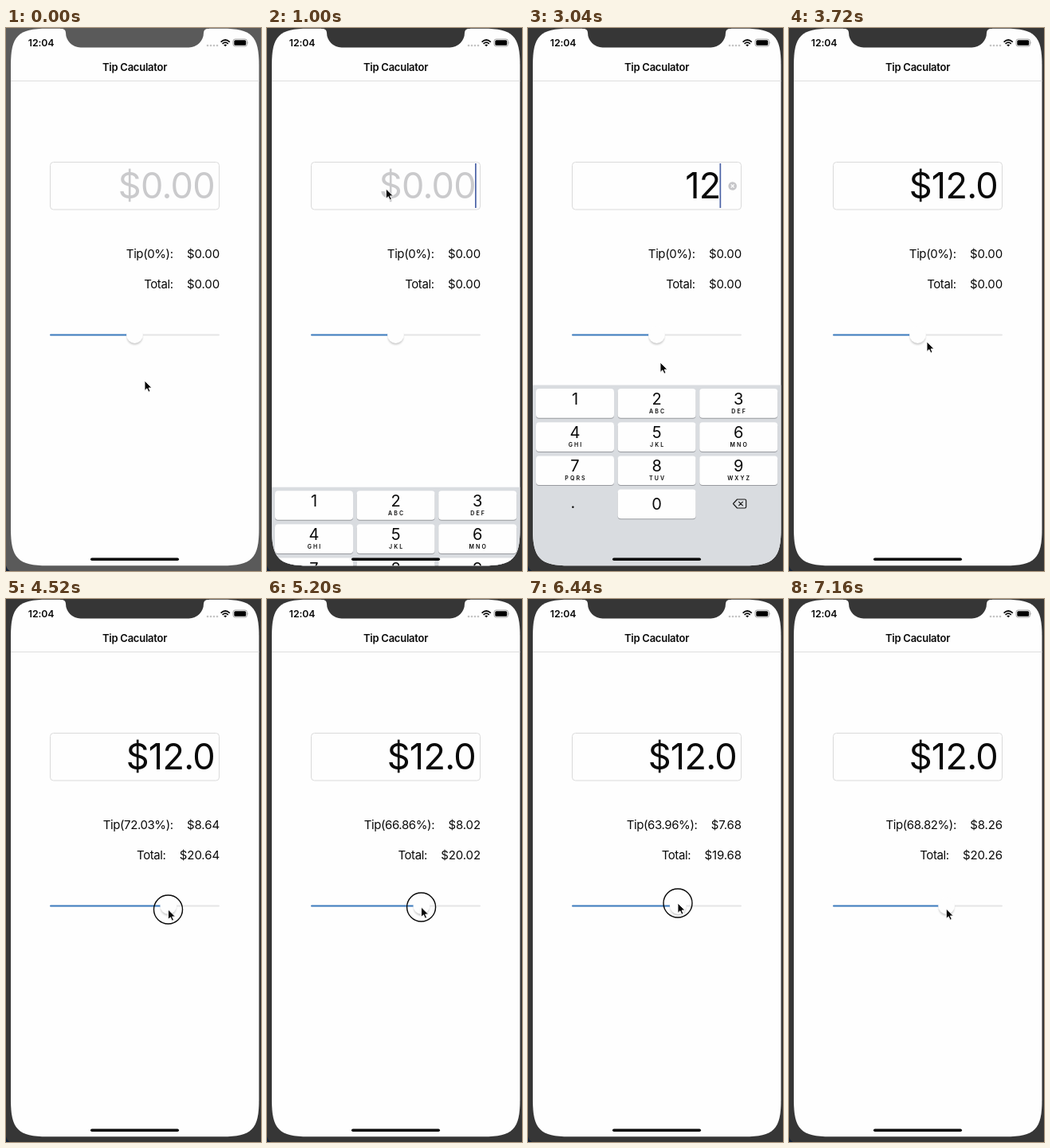
An HTML page that plays this animation: 320 px wide and 682 px high, repeating every 7.2 s.

```html
<!DOCTYPE html>
<html lang="en">
<head>
<meta charset="utf-8">
<title>Tip Caculator</title>
<style>
  html, body { margin: 0; width: 100%; height: 100%; overflow: hidden; background: #363636; }
  svg { display: block; width: 100vw; height: 100vh; }
  text { font-family: Inter, Roboto, "Liberation Sans", sans-serif; fill: #0a0a0a; }
  .big { font-size: 45px; letter-spacing: -0.7px; text-anchor: end; }
  .label { font-size: 15px; letter-spacing: -0.1px; text-anchor: end; }
  .name { letter-spacing: -0.4px; }
  .digit { font-size: 20px; text-anchor: middle; }
  .letters { font-size: 7px; font-weight: 600; letter-spacing: 2.1px; text-anchor: middle; }
</style>
</head>
<body>
<svg viewBox="0 0 320 682" preserveAspectRatio="none">
  <defs>
    <clipPath id="screen">
      <path d="M6 46.8C6 9.9 15.1 .8 52 .8H271.5C308.4 .8 317.5 9.9 317.5 46.8V629.3
        C317.5 666.2 308.4 675.3 271.5 675.3H52C15.1 675.3 6 666.2 6 629.3Z"/>
    </clipPath>
    <filter id="soft" x="-50%" y="-50%" width="200%" height="200%">
      <feGaussianBlur stdDeviation="1.3"/>
    </filter>
  </defs>

  <rect id="bezel" width="320" height="682"/>
  <path d="M0 675Q1 680 5 682H0Z" fill="#14233a"/>

  <g clip-path="url(#screen)">
    <rect width="320" height="682" fill="#fefefe"/>
    <path d="M6 66.5H318" stroke="#dedede"/>
    <text x="161.5" y="54.3" font-size="13" font-weight="600" letter-spacing="-0.25" text-anchor="middle">Tip Caculator</text>

    <text x="27.8" y="23" font-size="12.3" font-weight="600" letter-spacing="-0.1">12:04</text>
    <g fill="#c4c4c4">
      <circle cx="253" cy="22" r="1.3"/><circle cx="257" cy="22" r="1.3"/>
      <circle cx="261" cy="22" r="1.3"/><circle cx="265" cy="22" r="1.3"/>
    </g>
    <g fill="none" stroke="#0a0a0a" stroke-width="1.7">
      <path d="M269.6 17.6Q275.2 12.4 280.8 17.6M271.6 19.8Q275.2 16.6 278.8 19.8"/>
      <path d="M273.2 21.2Q275.2 19.6 277.2 21.2L275.2 23.2Z" fill="#0a0a0a" stroke="none"/>
    </g>
    <rect x="285" y="14" width="17.5" height="9" rx="2.6" fill="none" stroke="#999" stroke-width=".9"/>
    <rect x="286.3" y="15.3" width="14.9" height="6.4" rx="1.5"/>
    <path d="M303.6 17Q305 18.5 303.6 20Z" fill="#999"/>

    <rect x="55.5" y="168.5" width="212" height="59.5" rx="4" fill="#fefefe" stroke="#dadada"/>
    <text id="amount" class="big" y="214.4"></text>
    <rect id="caret" y="170" width="1.7" height="56" fill="#4a62a6"/>
    <g id="clear">
      <circle cx="256.7" cy="198.5" r="5.3" fill="#c6c6c9"/>
      <path d="M254.7 196.5l4 4m0-4l-4 4" stroke="#fff" stroke-width="1.1"/>
    </g>

    <text id="tipName" class="label name" y="289"></text>
    <text id="tip" class="label" x="268" y="289"></text>
    <text id="totalName" class="label name" y="326.5">Total:</text>
    <text id="total" class="label" x="268" y="326.5"></text>

    <rect x="55" y="384.4" width="213" height="2.2" rx="1.1" fill="#e5e5e6"/>
    <rect id="fill" x="55" y="384.4" height="2.2" rx="1.1" fill="#3f7ec1"/>
    <g id="thumb">
      <circle cy="388" r="9.8" fill="#000" opacity=".2" filter="url(#soft)"/>
      <circle cy="385.5" r="10.4" fill="#fefefe"/>
    </g>

    <g id="keyboard"><rect y="448.5" width="320" height="234" fill="#d9dce0"/></g>
    <rect x="106" y="665.4" width="111" height="3.6" rx="1.8" fill="#050505"/>
  </g>

  <path id="notch" d="M68 0V.8Q75 .8 75 6A18.5 18.5 0 0 0 93.5 24.5H229.5A18.5 18.5 0 0 0 248 6Q248 .8 255 .8V0Z"/>

  <circle id="touch" r="18" fill="none" stroke="#0a0a0a" stroke-width="1.4"/>
  <path id="cursor" d="M0 0V12.4L2.9 9.8L4.9 14.2L7 13.2L5.1 9H9Z" fill="#080808" stroke="#fff" stroke-width=".9"/>
</svg>

<script>
const LOOP = 7200, STEP = 40;
const PRESS = 3920, RELEASE = 7040, FOCUS = 640, EDIT = 920, DONE = 3280;
const el = id => document.getElementById(id);
const set = (id, attrs) => { for (const k in attrs) el(id).setAttribute(k, attrs[k]); };
const show = (id, on) => set(id, { visibility: on ? "visible" : "hidden" });
const ramp = (t, a, b) => Math.min(1, Math.max(0, (t - a) / (b - a)));
const easeOut = p => 1 - (1 - p) ** 3;
const money = n => "$" + n.toFixed(2);

// Pointer path: time, x, y
const path = [
  [0, 174, 443], [120, 178, 438], [280, 164, 290], [440, 151, 194], [960, 151, 194],
  [1240, 114, 370], [1480, 100, 435], [1700, 88, 452], [1920, 68, 469], [2320, 68, 469],
  [2520, 134, 475], [2760, 134, 475], [3040, 166, 420], [3240, 168, 408], [3480, 170, 400],
  [3720, 173, 394], [3880, 162, 388], [4120, 186, 389], [4280, 186, 389], [4760, 221, 391],
  [4920, 221, 391], [5200, 193.571, 387], [5680, 111, 379], [5760, 108.88, 378],
  [5920, 108.88, 378], [6440, 188, 382], [6640, 208, 389], [6880, 198, 391],
  [7000, 198, 391], [7120, 197.334, 389], [7200, 197.334, 389]
];

// Smooth curve through the points that never overshoots them
function along(t, axis) {
  const slope = i => {
    const a = path[i], b = path[i + 1];
    return a && b ? (b[axis] - a[axis]) / (b[0] - a[0]) : 0;
  };
  const tangent = i => {
    const l = slope(i - 1), r = slope(i);
    return l * r > 0 ? 2 * l * r / (l + r) : 0;
  };
  let i = 0;
  while (i < path.length - 2 && t >= path[i + 1][0]) i++;
  const a = path[i], b = path[i + 1], d = b[0] - a[0], u = (t - a[0]) / d, v = 1 - u;
  return a[axis] * v * v * (1 + 2 * u) + b[axis] * u * u * (3 - 2 * u)
    + d * u * v * (v * tangent(i) - u * tangent(i + 1));
}

function buildKeys() {
  const letters = ["", "ABC", "DEF", "GHI", "JKL", "MNO", "PQRS", "TUV", "WXYZ"];
  const key = (n, col, row, sub = "") => {
    const x = 10 + col * 102.6, y = 453 + row * 42.2, mid = x + 49;
    return `<rect x="${x}" y="${y + 1}" width="98" height="36.7" rx="4" fill="#989a9f"/>
      <rect x="${x}" y="${y}" width="98" height="36.7" rx="4" fill="#fefefe"/>
      <text class="digit" x="${mid}" y="${y + (n ? 20 : 25)}">${n}</text>
      <text class="letters" x="${mid + 1}" y="${y + 30.5}">${sub}</text>`;
  };
  const keys = letters.map((s, i) => key(i + 1, i % 3, Math.floor(i / 3), s)).join("");
  el("keyboard").innerHTML += keys + key(0, 1, 3) +
    `<text class="digit" x="56.5" y="603">.</text>
     <path d="M257.5 597.5L262.5 592H272Q273.7 592 273.7 593.7V601.3Q273.7 603 272 603H262.5Z
       M264.3 594.8l5.4 5.4m0-5.4l-5.4 5.4" fill="none" stroke="#1a1a1a" stroke-width="1.2" stroke-linejoin="round"/>`;
}

function drawField(t) {
  const typed = t >= 2200 && t < DONE;
  const text = t < 2200 ? "$0.00" : t < 2720 ? "1" : t < DONE ? "12" : "$12.0";
  el("amount").textContent = text;
  set("amount", { x: typed ? 241.5 : 262 });
  el("amount").style.fill = t < 2200 ? "#cacacc" : "#0a0a0a";
  show("clear", typed);
  show("caret", t >= EDIT && t < DONE);
  const blink = 1 - ramp(t, 1400, 1560) + ramp(t, 1760, 1920);
  set("caret", { x: typed ? 240.5 : 261, opacity: blink });
}

function drawTotals(t, thumb) {
  const moved = t >= PRESS;
  const percent = (thumb - 65.5) / 1.92;
  const tip = moved ? 12 * percent / 100 : 0;
  el("tipName").textContent = `Tip(${moved ? percent.toFixed(2) : 0}%):`;
  el("tip").textContent = money(tip);
  el("total").textContent = money(moved ? 12 + tip : 0);
  for (const id of ["tip", "total"])
    set(id + "Name", { x: 268 - el(id).getComputedTextLength() - 17.3 });
}

function draw(time) {
  const t = Math.floor((time % LOOP) / STEP) * STEP;
  const x = along(t, 1), y = along(t, 2);
  const thumb = t < PRESS ? 161.5 : x + 0.3;
  const shade = t < FOCUS ? "#5a5a5a" : "#363636";
  set("bezel", { fill: shade });
  set("notch", { fill: shade });
  drawField(t);
  drawTotals(t, thumb);
  set("fill", { width: thumb - 55 });
  set("thumb", { transform: `translate(${thumb} 0)` });
  const up = easeOut(ramp(t, EDIT, 1360)) - easeOut(ramp(t, DONE, 3640));
  set("keyboard", { transform: `translate(0 ${234 * (1 - up)})` });
  show("keyboard", up > 0);
  show("touch", t >= PRESS && t < RELEASE);
  set("touch", { cx: x, cy: y });
  set("cursor", { transform: `translate(${x} ${y})` });
}

buildKeys();
let start;
function tick(now) {
  start ??= now;
  draw(now - start);
  requestAnimationFrame(tick);
}
draw(0);
requestAnimationFrame(tick);
</script>
</body>
</html>
```
